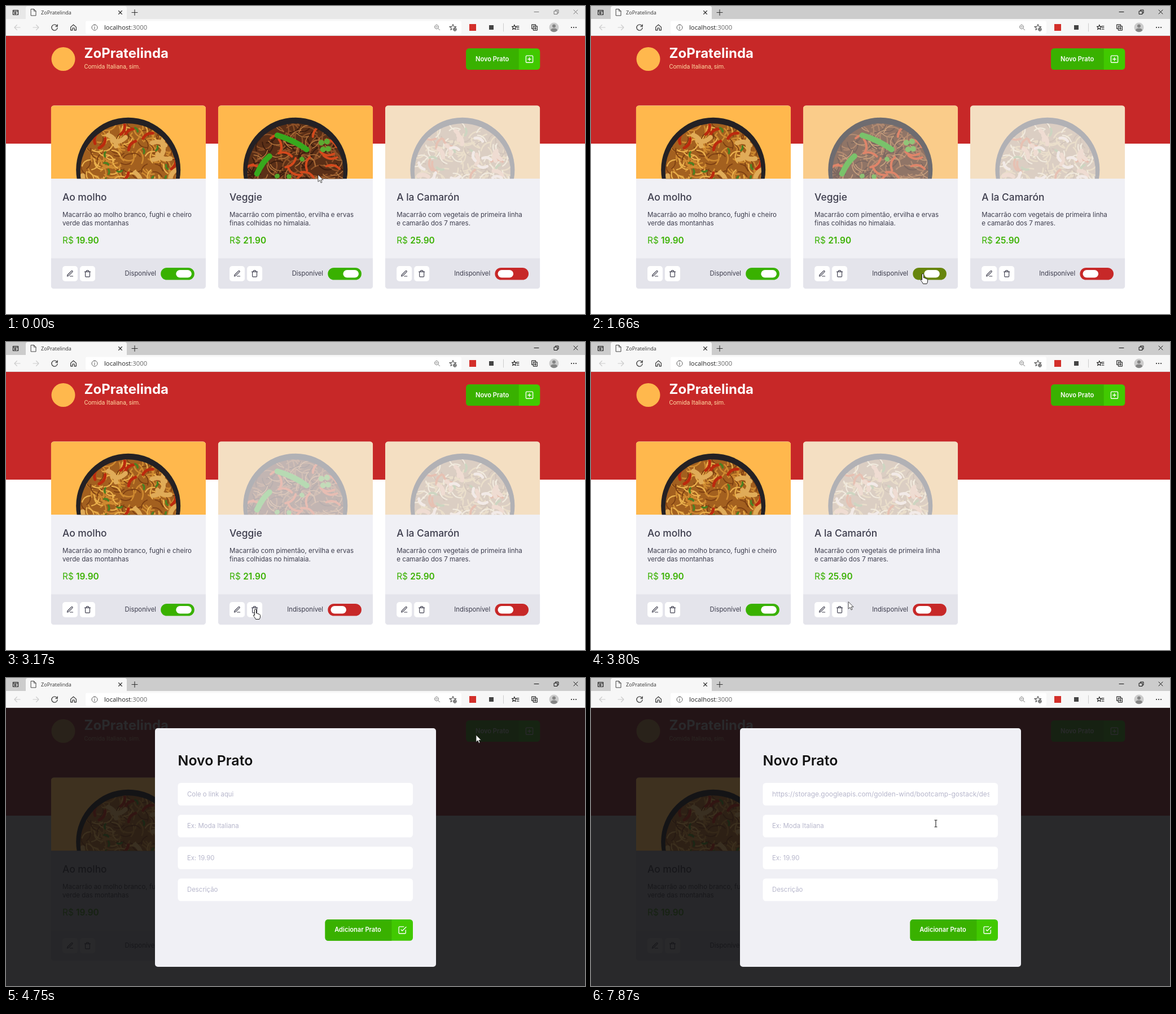
Animation, 1026 px wide and 546 px high, one loop 8000 ms. Source, as an HTML page:

```html
<!DOCTYPE html>
<html lang="pt-BR">
<head>
<meta charset="utf-8">
<title>ZoPratelinda</title>
<style>
  html, body { margin: 0; height: 100%; overflow: hidden; background: #fff; }
  svg { display: block; width: 100vw; height: 100vh; font-family: Inter, sans-serif; }
  .ui { font-family: "Open Sans", sans-serif; }
  .line { fill: none; stroke-linecap: round; stroke-linejoin: round; }
</style>
</head>
<body>
<svg id="stage" viewBox="0 0 1026 546"></svg>
<script>
const RED = [199, 40, 40], GREEN = [57, 177, 0];
const CARD_X = [79.7, 375.8, 671.9], CARD_Y = 176.3, CARD_W = 274.4;
const rgb = c => `rgb(${c.map(Math.round)})`;
const clamp = v => Math.min(1, Math.max(0, v));
const $ = id => document.getElementById(id);

const rect = (x, y, w, h, fill, r = 0, more = '') =>
  `<rect x="${x}" y="${y}" width="${w}" height="${h}" rx="${r}" fill="${fill}" ${more}/>`;
const text = (x, y, size, fill, str, weight = 400, more = '') =>
  `<text x="${x}" y="${y}" font-size="${size}" fill="${fill}" font-weight="${weight}" ${more}>${str}</text>`;
const line = (d, color, width = 1, more = '') =>
  `<path class="line" d="${d}" stroke="${color}" stroke-width="${width}" ${more}/>`;

// Icons live on a 24 unit grid and are placed by their centre
const icons = {
  edit: 'M12 20h9M16.5 3.5a2.1 2.1 0 0 1 3 3L7 19l-4 1 1-4z',
  trash: 'M3 6h18M19 6v14a2 2 0 0 1-2 2H7a2 2 0 0 1-2-2V6m3 0V4a2 2 0 0 1 2-2h4a2 2 0 0 1 2 2v2',
  plus: 'M5 3h14a2 2 0 0 1 2 2v14a2 2 0 0 1-2 2H5a2 2 0 0 1-2-2V5a2 2 0 0 1 2-2zM12 8v8M8 12h8',
  check: 'M9 11l3 3L22 4M21 12v7a2 2 0 0 1-2 2H5a2 2 0 0 1-2-2V5a2 2 0 0 1 2-2h11',
  back: 'M21 12H3M11 4l-8 8 8 8',
  forward: 'M3 12h18M13 4l8 8-8 8',
  reload: 'M20 8a9 9 0 1 0 1 5M21 3v6h-6',
  home: 'M3 11l9-8 9 8v10h-6v-7H9v7H3z',
  info: 'M12 2a10 10 0 1 0 .1 0M12 11v6M12 7v.2',
  zoom: 'M10 3a7 7 0 1 0 .1 0M15 15l6 6M7 10h6',
  star: 'M12 2l3 7 7 .6-5 4.8M9 17l-4 3 1.5-7L1 9.6l8-.6 3-7M18 13a5 5 0 1 0 .1 0M18 15v6M15 18h6',
  favorites: 'M8 3l2 6h5l-4 4 1 6-5-4-5 4 2-6-4-4h6zM16 8h7M16 13h7M16 18h7',
  collections: 'M6 16H3V3h13v3M8 8h13v13H8zM14.5 11v7M11 14.5h7'
};
const icon = (name, x, y, scale, color, width = 2) =>
  line(icons[name], color, width, `transform="translate(${x} ${y}) scale(${scale}) translate(-12 -12)"`);

function random(seed) {
  return () => (seed = seed * 16807 % 2147483647) / 2147483647;
}

// Short curved strips scattered over the food disc
function strips(next, count, color, length, width) {
  let d = '';
  for (let i = 0; i < count; i++) {
    const a = next() * 6.283, r = Math.sqrt(next()) * 84, turn = next() * 6.283;
    const dx = length * Math.cos(turn), dy = length * Math.sin(turn);
    const x = 137 + r * Math.cos(a) - dx / 2, y = 117 + r * Math.sin(a) - dy / 2;
    const points = [dx / 2 - dy / 3, dy / 2 + dx / 3, dx, dy].map(v => v.toFixed(1));
    d += `M${x.toFixed(1)} ${y.toFixed(1)}q${points.join(' ')}`;
  }
  return line(d, color, width);
}

// food rows: count, colour, length, width
const dishes = [
  { name: 'Ao molho', price: '19.90', on: true,
    about: ['Macarrão ao molho branco, fughi e cheiro', 'verde das montanhas'],
    base: '#a3601f', food: [[110, '#cf8a30', 22, 2.5], [60, '#7d3f12', 18, 1.8], [60, '#eab04c', 18, 2.2],
      [13, '#bb2a0e', 20, 5], [15, '#e0ab58', 24, 8], [16, '#4c7f22', 8, 3.5]] },
  { name: 'Veggie', price: '21.90', on: true,
    about: ['Macarrão com pimentão, ervilha e ervas', 'finas colhidas no himalaia.'],
    base: '#5a2f17', food: [[130, '#8d5027', 26, 2.2], [60, '#3a1c0e', 22, 2], [60, '#b0723a', 22, 1.6],
      [24, '#d4491c', 24, 4], [6, '#54a52b', 1, 8]],
    extra: line('M105 53q28 8 52 25M69 121q9-20 22-31', '#37a81d', 10) +
      line('M183 66h.1M193 64h.1M186 78h.1M195 77h.1', '#5cab31', 10) },
  { name: 'A la Camarón', price: '25.90', on: false,
    about: ['Macarrão com vegetais de primeira linha', 'e camarão dos 7 mares.'],
    base: '#ad8250', food: [[100, '#dcb66c', 22, 2.5], [40, '#8f6436', 18, 2], [60, '#f3dda8', 19, 2.2],
      [9, '#d1581c', 20, 4], [9, '#7f9a4a', 12, 4], [15, '#efb080', 17, 7], [15, '#f9dfc6', 15, 5]] }
];

function photo(dish, i) {
  const next = random(4211 + i * 977);
  return `<g id="photo${i}" opacity="${dish.on ? 1 : .3}" clip-path="url(#photoClip)">
    ${rect(0, 0, CARD_W, 130, '#ffb84d')}
    <circle cx="137" cy="114" r="92.5" fill="#242124"/>
    <circle cx="137" cy="117" r="85" fill="${dish.base}"/>
    <g clip-path="url(#bowlClip)">${dish.food.map(([n, c, l, w]) => strips(next, n, c, l, w)).join('')}${dish.extra || ''}</g>
  </g>`;
}

function card(dish, i) {
  const ink = '#3d3d4d', track = rgb(dish.on ? GREEN : RED);
  return `<g id="card${i}" transform="translate(${CARD_X[i]} ${CARD_Y})">
    <g clip-path="url(#cardClip)">
      ${rect(0, 0, CARD_W, 325, '#f0f0f5')}${photo(dish, i)}${rect(0, 271, CARD_W, 54, '#e4e4eb')}
    </g>
    ${text(20.3, 169, 17.4, ink, dish.name, 500)}
    ${dish.about.map((s, n) => text(20.3, 197.7 + n * 15.5, 11.55, ink, s)).join('')}
    ${text(20.3, 244.8, 15.4, rgb(GREEN), 'R$ <tspan font-weight="600">' + dish.price + '</tspan>')}
    ${rect(20.3, 284.7, 27, 27, '#fff', 5)}${icon('edit', 33.8, 298.2, .564, ink)}
    ${rect(51.3, 284.7, 27, 27, '#fff', 5)}${icon('trash', 64.8, 298.2, .564, ink)}
    ${text(186.3, 302.2, 11.3, ink, dish.on ? 'Disponível' : 'Indisponível', 400, `id="label${i}" text-anchor="end"`)}
    ${rect(194.5, 287.6, 59.6, 21.7, track, 10.8, `id="track${i}"`)}
    ${rect(dish.on ? 221.6 : 199.6, 291.6, 27.6, 13.6, '#fff', 6.8, `id="knob${i}"`)}
  </g>`;
}

const button = (x, y, w, label, name) =>
  rect(x, y, w, 37.8, '#41c900', 5.4) +
  `<path d="M${x + 5.4} ${y}h${w - 43}v37.8h${43 - w}a5.4 5.4 0 0 1-5.4-5.4v-27a5.4 5.4 0 0 1 5.4-5.4z" fill="${rgb(GREEN)}"/>` +
  text(x + 16.7, y + 22.4, 11.1, '#fff', label, 600) + icon(name, x + w - 18.8, y + 18.9, .677, '#fff');

const fieldTops = [186, 242.5, 299, 355.5];
const hints = ['Cole o link aqui', 'Ex: Moda Italiana', 'Ex: 19.90', 'Descrição'];
const link = 'https://storage.googleapis.com/golden-wind/bootcamp-gostack/desafio-food/food2.png';

const browser = `<g class="ui">
  ${rect(0, 0, 1026, 23, '#ccc', 0, 'id="strip"')}${rect(0, 23, 1026, 30, '#f7f7f7')}${rect(0, 52, 1026, 1, '#dadada')}
  <path d="M35 23V4q0-4 4-4h171q4 0 4 4v19z" fill="#f7f7f7"/>
  ${line('M12.5 7.5h9v8h-9zM12.5 9.5h9M19 12.5h-4m1.5-1.5l-1.5 1.5 1.5 1.5', '#222', 1.2)}
  ${line('M44.5 5.5h5l3.5 3.5v8h-8.5zM49.5 5.5v3.5h3.5', '#444')}
  ${text(62, 15, 9.1, '#333', 'ZoPratelinda')}
  ${line('M199.5 8.5l6 6m0-6l-6 6M223 11.5h10M228 6.5v10', '#333', 1.1)}
  <g id="controls">${line('M936 10.5h8M971.5 9h5.5v5.5h-5.5zM973.5 8.5v-1.5h5.5v5.5h-1.5M1006 7l7 7m0-7l-7 7', 'currentColor')}</g>
  ${icon('back', 20, 38, .56, '#ccc')}${icon('forward', 53, 38, .56, '#ccc')}
  ${icon('reload', 86, 38, .57, '#222')}${icon('home', 119.5, 38, .54, '#222')}
  ${rect(141, 26.5, 666, 23, '#fff', 3)}${icon('info', 157, 38, .5, '#555')}
  ${text(174, 42, 11.3, '#222', 'localhost<tspan fill="#666">:3000</tspan>')}
  ${icon('zoom', 764, 38, .5, '#777')}${icon('star', 792, 38, .56, '#555')}
  ${rect(821, 32, 12, 12, '#d32f2a')}${rect(856, 34, 8, 8, '#444')}
  ${line('M881.5 31v14', '#ccc')}${icon('favorites', 903, 38, .54, '#222')}${icon('collections', 936.5, 38, .54, '#222')}
  <circle cx="971" cy="38" r="8.5" fill="#ccc"/><circle cx="971" cy="35.5" r="3" fill="#858585"/>
  <path d="M965 43.5q0-4 6-4t6 4q-6 5-12 0z" fill="#858585"/>
  ${line('M1002 38h.1M1006 38h.1M1010 38h.1', '#222', 2)}
</g>`;

const modal = `<g id="modal">
  ${rect(0, 53, 1026, 493, '#121214', 0, 'opacity=".9"')}
  <g transform="translate(${CARD_X[0]} ${CARD_Y})" clip-path="url(#cardClip)" opacity=".1"><use href="#photo0"/></g>
  ${rect(264, 89, 498, 423, '#f0f0f5', 5)}${text(304.5, 155.3, 24.9, '#111', 'Novo Prato', 600)}
  ${fieldTops.map(y => rect(304.5, y, 416.5, 40, '#fff', 5.4)).join('')}
  <g clip-path="url(#fieldClip)">
    ${fieldTops.map((y, i) => text(321, y + 23.7, 11.4, '#b7b7cc', hints[i], 400, `id="field${i}"`)).join('')}
  </g>
  ${rect(321, 198, 1, 15, '#a9a9c0', 0, 'id="caret"')}
  ${button(565.5, 428, 155.5, 'Adicionar Prato', 'check')}
</g>`;

$('stage').innerHTML = `<defs>
    <clipPath id="cardClip">${rect(0, 0, CARD_W, 325, '#000', 5.4)}</clipPath>
    <clipPath id="photoClip">${rect(0, 0, CARD_W, 130, '#000')}</clipPath>
    <clipPath id="bowlClip"><circle cx="137" cy="117" r="85"/></clipPath>
    <clipPath id="fieldClip">${rect(321, 180, 385, 220, '#000')}</clipPath>
  </defs>
  ${rect(0, 0, 1026, 546, '#fff')}${rect(0, 53, 1026, 191, rgb(RED))}
  <circle cx="101.5" cy="94" r="21" fill="#ffb84d"/>
  ${text(138.5, 92, 24, '#fff', 'ZoPratelinda', 700)}
  ${text(138.5, 111, 10.7, '#ffd8a0', 'Comida Italiana, sim.', 400, 'font-family="Roboto, sans-serif"')}
  ${button(815.3, 75.3, 131, 'Novo Prato', 'plus')}
  ${dishes.map(card).join('')}${browser}${modal}
  <circle id="click" r="9.5" fill="#ffe600" opacity=".65"/>
  <path id="cursor" stroke-linejoin="round"/>`;

const cursors = {
  arrow: ['M0 0V12.5L3 9.8 5 14.4 7 13.5 5 9.1H9Z', '#fff', '#222', .8],
  hand: ['M-1.5 11V1a1.5 1.5 0 0 1 3 0V7l1-.3q1.5 0 1.5 1.3l1-.2q1.5 0 1.5 1.2l.8-.1q1.2.2 1.2 1.5V13q0 2-1.5 4.5h-6.5q-1-2.5-4-6q-.5-2 1-2z', '#fff', '#222', 1],
  beam: ['M-2.5-6h5M0-6V6M-2.5 6h5', 'none', '#222', 1.1]
};
// start, end, then the point moved to
const moves = [[480, 1340, 588, 475], [2170, 2870, 442, 474], [3720, 4430, 833, 101],
  [5150, 5700, 633.5, 204], [6710, 7320, 611, 258]];
const clicks = [[1420, 1580, 588, 475], [3090, 3170, 442, 474], [4580, 4750, 832.5, 100],
  [5850, 5940, 631.5, 203.5], [7470, 7550, 609, 256]];
// left, top, right, bottom
const handAreas = [[570, 464, 630, 486], [396, 461, 423, 488], [427, 461, 454, 488], [815, 75, 946, 113]];
const textAreas = [[396, 363, 618, 392]];
const inputAreas = fieldTops.map(y => [304, y, 721, y + 40]);

function set(id, attrs) {
  for (const key in attrs) $(id).setAttribute(key, attrs[key]);
}
function show(id, visible) {
  $(id).style.display = visible ? '' : 'none';
}

function drawCursor(t, open) {
  let x = 553, y = 299;
  for (const [start, end, toX, toY] of moves) {
    const p = clamp((t - start) / (end - start)), e = p * p * (3 - 2 * p);
    x += (toX - x) * e;
    y += (toY - y) * e;
  }
  const inside = areas => areas.some(([l, top, r, b]) => x >= l && x <= r && y >= top && y <= b);
  const kind = !open && inside(handAreas) ? 'hand' : inside(open ? inputAreas : textAreas) ? 'beam' : 'arrow';
  const [d, fill, stroke, width] = cursors[kind];
  set('cursor', { d, fill, stroke, 'stroke-width': width, transform: `translate(${x} ${y})` });

  const click = clicks.find(([start, end]) => t >= start && t < end);
  show('click', click);
  if (click) set('click', { cx: click[2], cy: click[3] });
}

function draw(t) {
  const open = t >= 4750, removed = t >= 3250;
  set('strip', { fill: t < 70 ? '#e8e8e8' : '#ccc' });
  set('controls', { color: t < 70 ? '#777' : '#111' });

  const slide = clamp((t - 1577) / 260), fade = 1 - (1 - clamp((t - 1570) / 300)) ** 2;
  set('knob1', { x: 221.6 - 22 * slide });
  set('track1', { fill: rgb(GREEN.map((c, i) => c + (RED[i] - c) * slide)) });
  set('photo1', { opacity: 1 - .7 * fade });
  $('label1').textContent = t < 1577 ? 'Disponível' : 'Indisponível';
  show('card1', !removed);
  set('card2', { transform: `translate(${CARD_X[removed ? 1 : 2]} ${CARD_Y})` });

  show('modal', open);
  const pasted = t >= 6240, nextField = t >= 7320, atEnd = pasted && !nextField;
  $('field0').textContent = pasted ? link : hints[0];
  set('field0', { x: atEnd ? 705 : 321, 'text-anchor': atEnd ? 'end' : 'start', 'font-size': pasted ? 11.9 : 11.4 });
  set('caret', { x: atEnd ? 705 : 321, y: nextField ? 254.5 : 198 });
  show('caret', t >= 5850 && t < 6790 || nextField && t < 7870);

  drawCursor(t, open);
}

function tick() {
  draw(performance.now() % 8000);
  requestAnimationFrame(tick);
}
tick();
</script>
</body>
</html>
```
